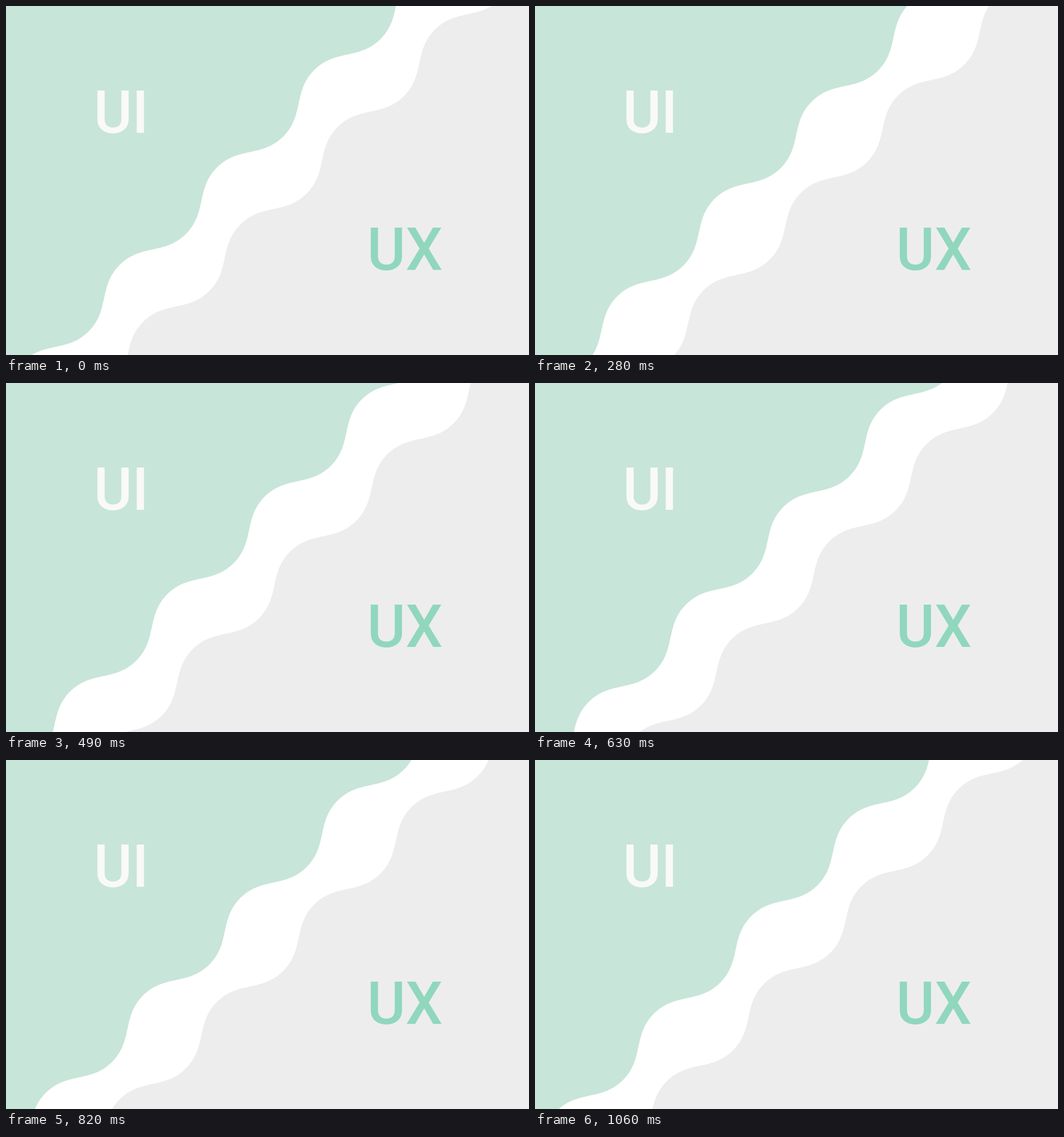
These frames come from a looping animation (917 by 611 pixels, 1.1 s). An HTML page with a canvas:

```html
<!DOCTYPE html>
<html lang="en">
<head>
<meta charset="utf-8">
<title>UI / UX</title>
<style>
  html, body { margin: 0; width: 100%; height: 100%; overflow: hidden; background: #fff; }
  canvas { display: block; width: 917px; height: 611px; }
</style>
</head>
<body>
<canvas id="stage" width="917" height="611"></canvas>
<script>
const W = 917, H = 611, LOOP = 1100, STEPS = 17;
const ctx = document.getElementById('stage').getContext('2d');

// Half a wave, measured along x; the waves run along 45-degree diagonals
const HALF = 85.3;

// Steps start on multiples of 10 ms and grow slightly shorter through the loop
const startOf = k => Math.max(0, 10 * Math.round((-26.79 + 79.52 * k - 0.73 * k * k) / 10));

// Distance slid by step k: quick at first, then easing off
const slide = k => k * (16.1 - 0.64 * k + 0.0165 * k * k);

function stepAt(ms) {
  let k = STEPS - 1;
  while (startOf(k) > ms) k--;
  return k;
}

// Fills one side of the wave around the line x + y = sum
function wave(sum, start, corner, color) {
  ctx.beginPath();
  for (let x = -150; x <= W + 150; x += 1.5) {
    const a = (x - start) / HALF * Math.PI;
    const d = (22.6 * Math.sin(a) + 0.7 * Math.sin(3 * a)) * Math.SQRT1_2;
    ctx.lineTo(x + d, sum - x + d);
  }
  ctx.lineTo(corner[0], corner[1]);
  ctx.closePath();
  ctx.fillStyle = color;
  ctx.fill();
}

// Centres the ink of a word on x
function word(text, x, baseline, color) {
  ctx.font = '500 103px Roboto, sans-serif';
  const m = ctx.measureText(text);
  const ink = (m.actualBoundingBoxRight - m.actualBoundingBoxLeft) / 2;
  ctx.fillStyle = color;
  ctx.fillText(text, x - ink, baseline);
}

function draw(ms) {
  const shift = slide(stepAt(ms % LOOP));
  ctx.fillStyle = '#fff';
  ctx.fillRect(0, 0, W, H);
  wave(683.5, 598.5 - shift, [-600, -600], '#c8e5d9');
  wave(824.3, 639.5 + shift, [W + 600, H + 600], '#ededed');
  word('UI', 201, 221.5, '#f9f9f9');
  word('UX', 701.8, 461.5, '#90d7be');
}

let begin;
function tick(now) {
  if (begin === undefined) begin = now;
  draw(now - begin);
  requestAnimationFrame(tick);
}
draw(0);
requestAnimationFrame(tick);
</script>
</body>
</html>
```
